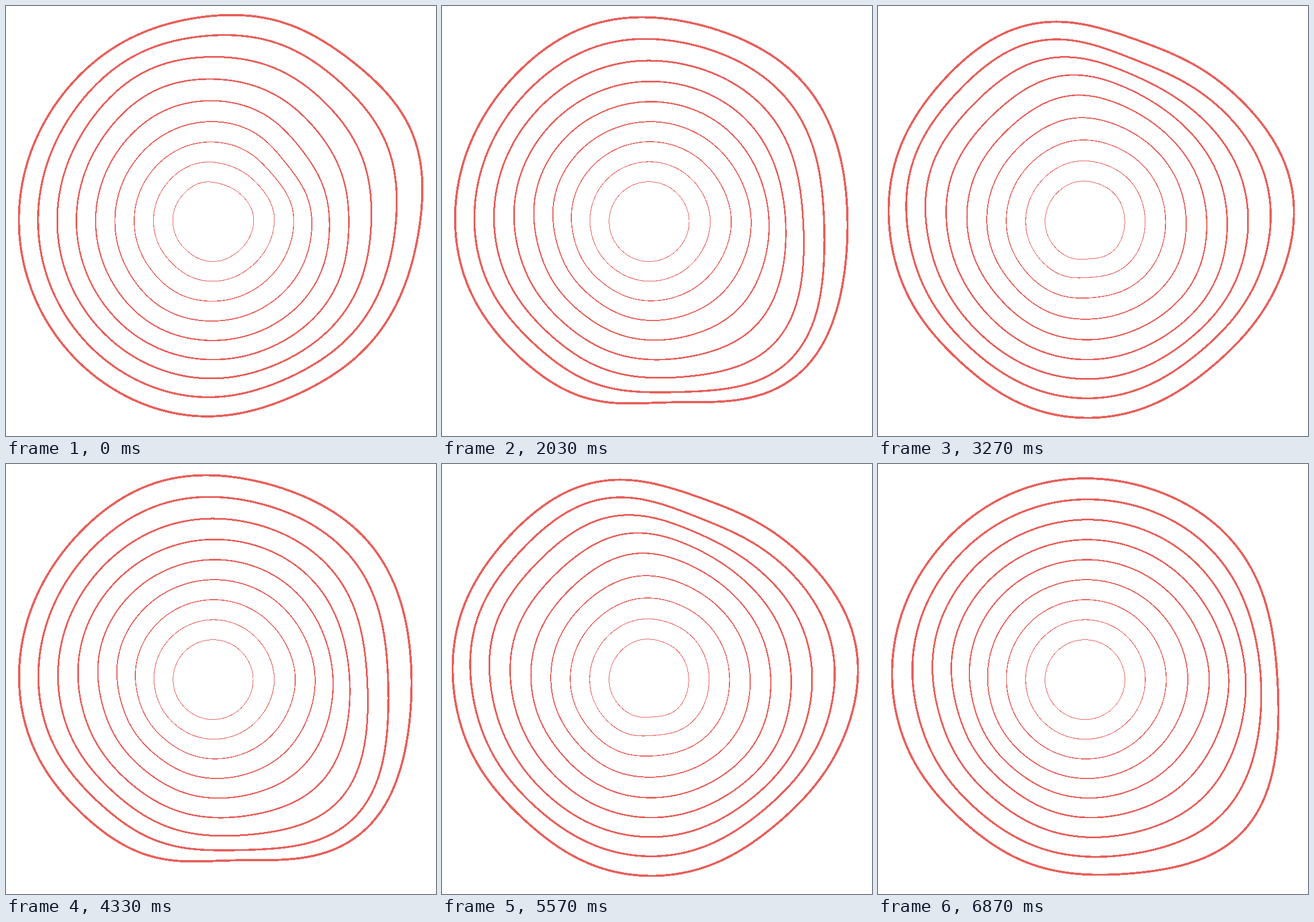
These frames come from a looping animation (748x748 px, 6.9 s). An HTML page:

```html
<!DOCTYPE html>
<html lang="en">
<head>
<meta charset="utf-8">
<title>Ripple rings</title>
<style>
  html, body { margin: 0; width: 100%; height: 100%; overflow: hidden; background: #fff; }
  svg { display: block; width: 748px; height: 748px; }
  path { fill: none; stroke: #e8605b; stroke-linejoin: round; shape-rendering: crispEdges; }
</style>
</head>
<body>
<svg id="stage" viewBox="0 0 748 748"></svg>
<script>
const CX = 359, CY = 375.5, GAP = 35, RINGS = 10;
const PERIOD = 2300, LAST_STEP = 45;
const DRIFT = 0.42;    // rings a ripple travels outward per step
const VERTICES = 180;
const RAD = Math.PI / 180;

// Ripples: direction in degrees clockwise from the right, the ring each
// one starts on (below 0: still to emerge), and its height at the rim.
const ripples = [
  [335, 10.5, 28], [290, 9.5, 17], [64, 9.6, -12], [248, 7.8, 14],
  [0, 6.6, -16], [322, 4.8, -32], [120, 4.3, 11],
  [350, 2.6, 15], [130, 2.4, -15], [48, 1.4, -14], [287, 1.3, -24],
  [252, 1, 17], [200, 0.2, 15], [314, 0, -11],
  [264, -1.9, 23], [30, -2, 10], [138, -2.8, -10],
  [84, -5.8, -36], [255, -6.6, 11], [318, -6.6, 10],
  [132, -7.8, -14], [45, -8, 35], [0, -8.6, -16], [340, -9.6, -8],
  [45, -10.8, 10], [165, -11.6, -14], [128, -11.8, -14], [0, -12.9, 11]
].map(([angle, ring, height]) => ({ angle: angle * RAD, ring, height }));

const SPREAD = 17 * RAD, LENGTH = 1.5;   // size of a ripple around and across the rings

const bell = x => Math.exp(-x * x / 2);
const around = a => Math.exp((Math.cos(a) - 1) / (SPREAD * SPREAD));

// All rings lean a little to the upper right.
const lean = a => 9 * Math.cos(a + 20 * RAD) - 5;

function ringPath(k, step) {
  const origin = k - step * DRIFT;
  const near = ripples.map(({ angle, ring, height }) =>
    ({ angle, lift: height * bell((origin - ring) / LENGTH) }));
  const swell = Math.pow(k / RINGS, 1.3);
  let d = "";
  for (let i = 0; i < VERTICES; i++) {
    const a = i / VERTICES * 2 * Math.PI;
    const bump = near.reduce((sum, p) => sum + p.lift * around(a - p.angle), lean(a));
    const r = GAP * k + swell * bump;
    d += (i ? "L" : "M") + (CX + r * Math.cos(a)).toFixed(2) + " " + (CY + r * Math.sin(a)).toFixed(2);
  }
  return d + "Z";
}

// Steps last 40 and 60 ms in turn; the first one is held longer.
function stepAt(t) {
  let i = Math.floor((t - 20) / 50);
  if (i % 2 === 0 && t < 50 * i + 30) i--;
  return Math.min(LAST_STEP, Math.max(0, i));
}

const stage = document.getElementById("stage");
const rings = [];
for (let k = 2; k <= RINGS; k++) {
  const path = document.createElementNS("http://www.w3.org/2000/svg", "path");
  path.setAttribute("stroke-width", Math.max(1, 0.38 * k).toFixed(2));
  stage.append(path);
  rings.push({ k, path });
}

let shown = -1;
function draw(step) {
  if (step === shown) return;
  shown = step;
  for (const { k, path } of rings) path.setAttribute("d", ringPath(k, step));
}

const start = performance.now();
function tick() {
  draw(stepAt((performance.now() - start) % PERIOD));
  requestAnimationFrame(tick);
}
tick();
</script>
</body>
</html>
```
